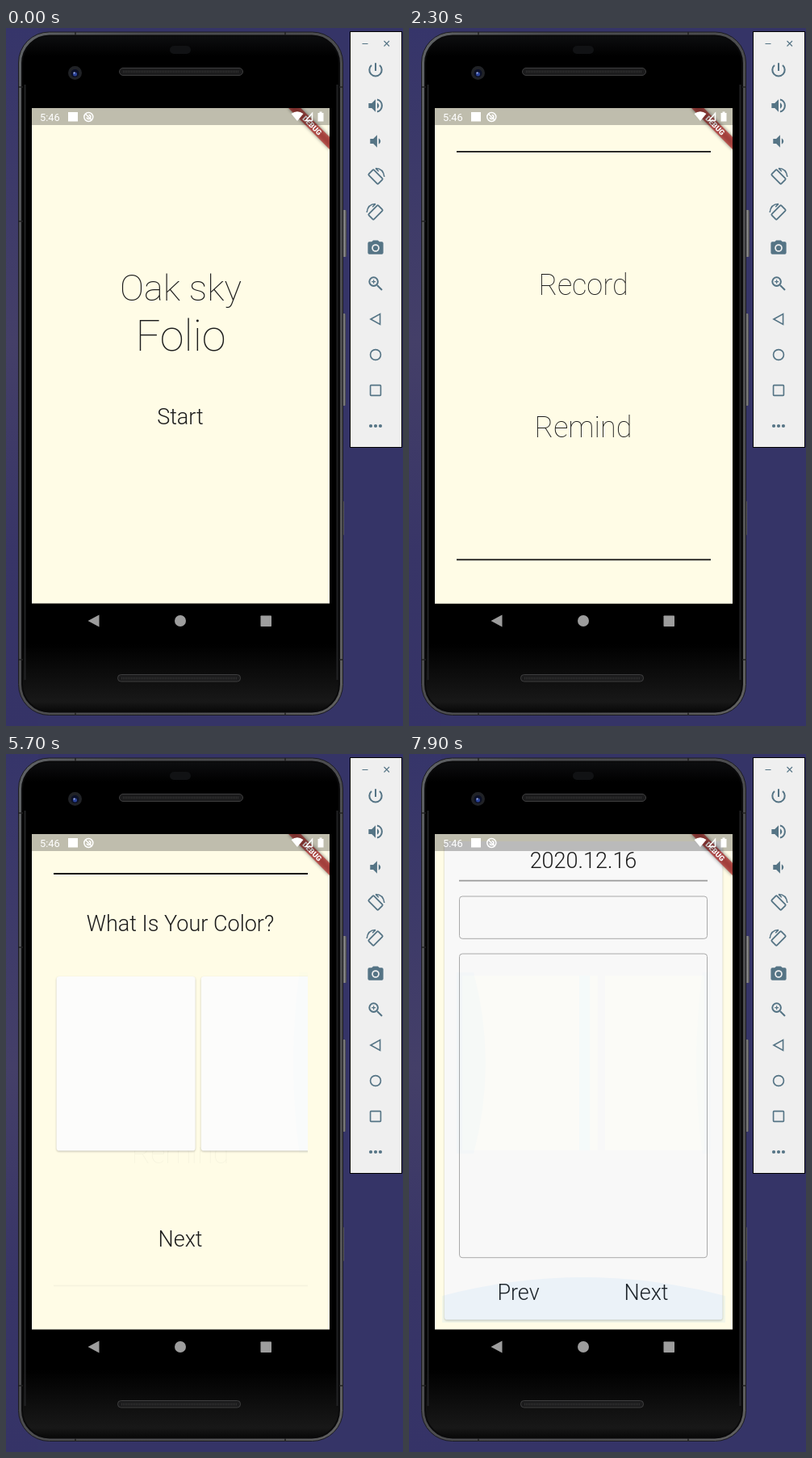
Animation of 492x863 px, one loop 8000 ms. Source, as an HTML page:

```html
<!DOCTYPE html>
<html lang="en">
<head>
<meta charset="utf-8">
<title>Diary app</title>
<style>
  html, body { margin: 0; width: 100%; height: 100%; overflow: hidden; background: #363467; }
  svg { display: block; width: 492px; height: 863px; }
  text { font-family: Roboto, sans-serif; text-anchor: middle; fill: #1c1c1c; }
  .thin { font-weight: 100; }
  .light { font-weight: 300; font-size: 27px; }
  .menu { font-weight: 100; font-size: 36px; }
  .rule { stroke: #111; stroke-width: 1.8; }
  .card { fill: #fcfcfb; filter: drop-shadow(0 1px 1px rgba(0, 0, 0, .24)); }
  .field { fill: none; stroke: #a9a9a9; stroke-width: 1; }
  .ripple { fill: #c8c8c8; fill-opacity: .42; }
  .glow { fill: #2196f3; }
  .icons { fill: none; stroke: #557485; stroke-width: 2.1; }
  .icons .solid { fill: #557485; stroke: none; }
</style>
</head>
<body>
<svg viewBox="0 0 492 863">
  <defs>
    <linearGradient id="wall" x2="0" y2="1">
      <stop offset="0" stop-color="#36356a"/>
      <stop offset=".45" stop-color="#443f68"/>
      <stop offset=".75" stop-color="#383567"/>
      <stop offset="1" stop-color="#353367"/>
    </linearGradient>
    <linearGradient id="rim" x2="1" y2="1">
      <stop offset="0" stop-color="#606366"/>
      <stop offset=".2" stop-color="#4a4b4e"/>
      <stop offset=".75" stop-color="#4d4d4f"/>
      <stop offset="1" stop-color="#606060"/>
    </linearGradient>
    <linearGradient id="body" x2="0" y2="1">
      <stop offset="0" stop-color="#0d0e10"/>
      <stop offset=".03" stop-color="#000"/>
      <stop offset=".9" stop-color="#000"/>
      <stop offset=".985" stop-color="#181818"/>
      <stop offset="1" stop-color="#080808"/>
    </linearGradient>
    <linearGradient id="key">
      <stop offset="0" stop-color="#333"/>
      <stop offset=".6" stop-color="#8a8a8c"/>
      <stop offset="1" stop-color="#3c3c3e"/>
    </linearGradient>
    <clipPath id="screen"><rect x="32" y="99" width="369" height="612.500"/></clipPath>
    <clipPath id="list"><rect x="59" y="270" width="315" height="224"/></clipPath>
    <clipPath id="form"><rect x="41" y="108" width="351" height="595"/></clipPath>
  </defs>

  <rect width="492" height="863" fill="#353467"/>
  <rect width="40" height="863" fill="url(#wall)"/>

  <!-- handset -->
  <g>
    <g fill="url(#key)">
      <rect x="416" y="225" width="6" height="58" rx="1.5"/>
      <rect x="416" y="353" width="5" height="114" rx="1.5"/>
      <rect x="416" y="585" width="3" height="42" rx="1"/>
    </g>
    <rect x="15.500" y="5" width="402" height="844.500" rx="38" fill="url(#rim)" stroke="#1c1c20"/>
    <rect x="20" y="9.500" width="393" height="836" rx="34" fill="url(#body)" stroke="#0a0a0b" stroke-width="2"/>
    <path d="M23.500 70V806M410.500 70V806" stroke="#222325" stroke-width="2"/>
    <path d="M16 73h5M16 239h5M16 781h5M413 73h5M413 781h5M86 5v4M346 5v4M86 846v4M346 846v4" stroke="#222" stroke-width="1.500"/>
    <rect x="203" y="22" width="26" height="10" rx="5" fill="#111214"/>
    <g fill="#1b1b1c" stroke="#3e3e3f">
      <rect x="140.500" y="49.500" width="153" height="9" rx="4.500"/>
      <rect x="138.500" y="799.500" width="152" height="8.500" rx="4"/>
    </g>
    <path d="M145 54H289M143 804H286" stroke="#303030" stroke-width="3" stroke-dasharray="1 1"/>
    <circle cx="85.500" cy="55.500" r="8.500" fill="#202226"/>
    <circle cx="85.500" cy="56" r="5" fill="#0b1026"/>
    <circle cx="85.500" cy="57" r="2.500" fill="#2d459b"/>
    <circle cx="84.500" cy="55.500" r="1" fill="#b5c3ee"/>
    <g fill="#9d9d9d">
      <path d="M101.500 733L115.500 725.500V740.500Z"/>
      <circle cx="216" cy="733" r="7"/>
      <rect x="315.500" y="726.500" width="13.500" height="13.500" rx=".8"/>
    </g>
  </g>

  <!-- app -->
  <g clip-path="url(#screen)">
    <rect x="32" y="99" width="369" height="613" fill="#fffce6"/>

    <g id="home">
      <circle id="tapStart" class="ripple" cx="222.500" cy="493.500"/>
      <text class="thin" x="216.500" y="337" font-size="45">Oak sky</text>
      <text class="thin" x="216.500" y="399" font-size="54">Folio</text>
      <text class="light" x="216" y="490">Start</text>
    </g>

    <g id="menu">
      <rect x="32" y="99" width="369" height="613" fill="#fffce6"/>
      <path class="rule" d="M59 152.900H374M59 657.300H374"/>
      <circle id="tapRecord" class="ripple" cx="199.500" cy="319.500"/>
      <text class="menu" x="216" y="330">Record</text>
      <text class="menu" x="216" y="506">Remind</text>
    </g>

    <g id="color">
      <g opacity=".03">
        <text class="menu" x="216" y="506">Remind</text>
        <path class="rule" d="M59 657.300H374"/>
      </g>
      <path class="rule" d="M59 148H374"/>
      <text class="light" x="216" y="219">What Is Your Color?</text>
      <g clip-path="url(#list)">
        <g id="cards">
          <rect class="card" x="62.600" y="275" width="172" height="215.500" rx="3.600"/>
          <rect class="card" x="241.800" y="275" width="172" height="215.500" rx="3.600"/>
        </g>
      </g>
      <circle id="tapNext" class="ripple" cx="222.500" cy="607.500"/>
      <text class="light" x="216" y="609">Next</text>
    </g>

    <g id="entry" clip-path="url(#form)">
      <rect id="sheet" class="card" x="44" y="132.500" width="344.500" height="602" rx="3.600" style="fill:#f8f8f8"/>
      <path d="M66 274H234V490H66ZM243 274H366V490H243Z" fill="#fffff4" opacity=".35"/>
      <path d="M211 274H224V490H211Z" fill="#e9f6ff" opacity=".35"/>
      <g id="fields">
        <text class="light" x="216" y="176">2020.12.16</text>
        <path d="M62 191.700H370" stroke="#9b9b9b" stroke-width="1.800"/>
        <rect class="field" x="62.500" y="211" width="307" height="52.300" rx="3.600"/>
        <rect class="field" x="62.500" y="282" width="307" height="375.700" rx="3.600"/>
        <text class="light" x="135.500" y="710">Prev</text>
        <text class="light" x="294" y="710">Next</text>
      </g>
    </g>

    <path id="glowMenu" class="glow" transform="translate(59 692)"/>
    <g clip-path="url(#list)">
      <path id="glowRight" class="glow" transform="translate(374 494) rotate(-90)"/>
      <path id="glowLeft" class="glow" transform="translate(59 270) rotate(90)"/>
    </g>
    <path id="glowForm" class="glow" transform="translate(41 703)"/>

    <!-- debug ribbon -->
    <g transform="translate(401 99) rotate(45) scale(.9)">
      <rect x="-40" y="28" width="80" height="12" fill-opacity=".5" style="filter:blur(2.500px)"/>
      <rect x="-40" y="28" width="80" height="12" fill="#b71c1c" fill-opacity=".63"/>
      <text y="37.600" font-size="10.200" font-weight="900" style="fill:#fff">DEBUG</text>
    </g>

    <!-- status bar -->
    <rect x="32" y="99" width="369" height="21" fill-opacity=".25"/>
    <text x="54.300" y="114.500" font-size="12.800" style="fill:#fff">5:46</text>
    <g fill="#fff">
      <rect x="77" y="104" width="12" height="11.500"/>
      <path d="M353.500 106Q361 100.500 368.500 106L361 115Z"/>
      <path d="M386.500 105h2v-1.500h3v1.500h2v10.500h-7Z"/>
    </g>
    <g fill="none" stroke="#fff" stroke-width="1.500">
      <circle cx="102.300" cy="110" r="5.500"/>
      <path d="M98.500 106.200L106 113.800M100 110.500a2.500 2.500 0 1 0 2.500-3"/>
      <path d="M371.500 114.500L379.500 105.500V114.500Z"/>
    </g>
  </g>

  <!-- emulator toolbar -->
  <rect x="426.500" y="4.500" width="64" height="514" fill="#efefef" stroke="#000"/>
  <g id="bar" class="icons"></g>
</svg>

<script>
  const $ = id => document.getElementById(id);
  const LOOP = 8000, STEP = 100;

  const speaker = x => `<path class="solid" d="M${x} -3h4l5 -5v16l-5 -5h-4Z"/>`;
  const rotate = '<rect x="-4.700" y="-8.700" width="9.400" height="17.400" rx="1.200" transform="rotate(-45)" stroke-width="1.900"/>' +
    '<path d="M0 -11Q10 -11 11.300 0M0 -11l4 4" stroke-width="1.600"/>';
  const icons = [
    '<path d="M0 -9V1M-5.200 -6.200A8 8 0 1 0 5.200 -6.200"/>',
    speaker(-9) + '<path class="solid" d="M2 -4Q4.500 -2.500 4.500 0T2 4Z"/><path d="M2 -7.800A8 8 0 0 1 2 7.800"/>',
    speaker(-7) + '<path class="solid" d="M4 -4Q6.500 -2.500 6.500 0T4 4Z"/>',
    rotate,
    `<g transform="scale(-1 1)">${rotate}</g>`,
    '<path class="solid" fill-rule="evenodd" d="M-3 -10H3L5 -8H8Q10 -8 10 -6V6Q10 8 8 8H-8Q-10 8 -10 6V-6Q-10 -8 -8 -8H-5ZM-5 0a5 5 0 1 0 10 0a5 5 0 1 0 -10 0Z"/><circle class="solid" r="3.200"/>',
    '<circle cx="-2.500" cy="-2.500" r="5.500"/><path d="M2 2L8.300 8.300"/><path d="M-5 -2.500h5M-2.500 -5v5" stroke-width="1.300"/>',
    '<path d="M-6.300 0L5.800 -6.700V6.700Z" stroke-width="1.700"/>',
    '<circle r="6.700" stroke-width="1.700"/>',
    '<rect x="-6.700" y="-6.700" width="13.400" height="13.400" rx="1" stroke-width="1.700"/>',
    [-6.2, 0, 6.2].map(x => `<circle class="solid" cx="${x}" r="2.200"/>`).join('')
  ];
  $('bar').innerHTML =
    '<path d="M441.500 19.500h7M468.500 16l6.500 6.500M475 16l-6.500 6.500" stroke-width="1.100"/>' +
    icons.map((art, i) => `<g transform="translate(458 ${52 + 44 * i}) scale(.96)">${art}</g>`).join('');

  // Linear value from [time, value] pairs
  function key(t, pairs) {
    let [t0, v0] = pairs[0];
    for (const [t1, v1] of pairs) {
      if (t < t1) return t1 > t0 ? v0 + (v1 - v0) * (t - t0) / (t1 - t0) : v0;
      t0 = t1;
      v0 = v1;
    }
    return v0;
  }

  function bezier(x1, y1, x2, y2) {
    const at = (a, b, s) => 3 * a * s * (1 - s) ** 2 + 3 * b * s * s * (1 - s) + s ** 3;
    return x => {
      let lo = 0, hi = 1;
      for (let i = 0; i < 24; i++) {
        const mid = (lo + hi) / 2;
        if (at(x1, x2, mid) < x) lo = mid; else hi = mid;
      }
      return at(y1, y2, lo);
    };
  }
  const fastOut = bezier(.4, 0, .2, 1), easeIn = bezier(.42, 0, 1, 1);

  const show = (id, on) => { $(id).style.display = on ? '' : 'none'; };
  const move = (id, x, y) => $(id).setAttribute('transform', `translate(${x} ${y})`);

  function ripple(id, t, from, to, pairs) {
    show(id, t >= from && t < to);
    $(id).setAttribute('r', key(t, pairs));
  }

  function glow(id, width, depth, alpha) {
    const side = -.59 * depth;
    $(id).setAttribute('d', `M0 0V${side}Q${width / 2} ${-1.41 * depth} ${width} ${side}V0Z`);
    $(id).setAttribute('opacity', alpha);
  }

  function draw(t) {
    show('home', t < 1100);
    show('menu', t >= 700 && t < 3400);
    show('color', t >= 3400 && t < 6900);
    show('entry', t >= 6900);

    const p = Math.min(1, Math.max(0, (t - 725) / 300));
    $('menu').setAttribute('opacity', easeIn(p));
    move('menu', 0, 153 * (1 - fastOut(p)) + key(t, [[1800, .2], [1900, 0]]));

    ripple('tapStart', t, 500, 1000, [[600, 5.5], [700, 14], [900, 40]]);
    ripple('tapRecord', t, 2800, 3400, [[2800, 5.5], [3100, 16]]);
    ripple('tapNext', t, 6200, 6900, [[6200, 5], [6500, 14]]);

    move('cards', key(t, [[4400, 0], [4500, -6], [4700, -36], [4800, -43],
      [5200, -43], [5300, -36], [5500, -6], [5600, 0]]), 0);
    glow('glowMenu', 315, 40, key(t, [[1800, 0], [2000, .05], [2300, 0]]));
    glow('glowRight', 224, 18, key(t, [[4700, 0], [4900, .08], [5100, .013]]));
    glow('glowLeft', 224, 36, key(t, [[5700, 0], [5900, .08], [6100, .02]]));

    const scroll = -key(t, [[7600, 0], [7700, 14], [7800, 35]]);
    move('sheet', 0, scroll);
    move('fields', 0, scroll);
    glow('glowForm', 351, key(t, [[7700, 20], [7900, 56]]), key(t, [[7700, 0], [7900, .06]]));
  }

  const start = performance.now();
  function tick() {
    const t = (performance.now() - start) % LOOP;
    draw(Math.floor(t / STEP) * STEP);
    requestAnimationFrame(tick);
  }
  tick();
</script>
</body>
</html>
```
